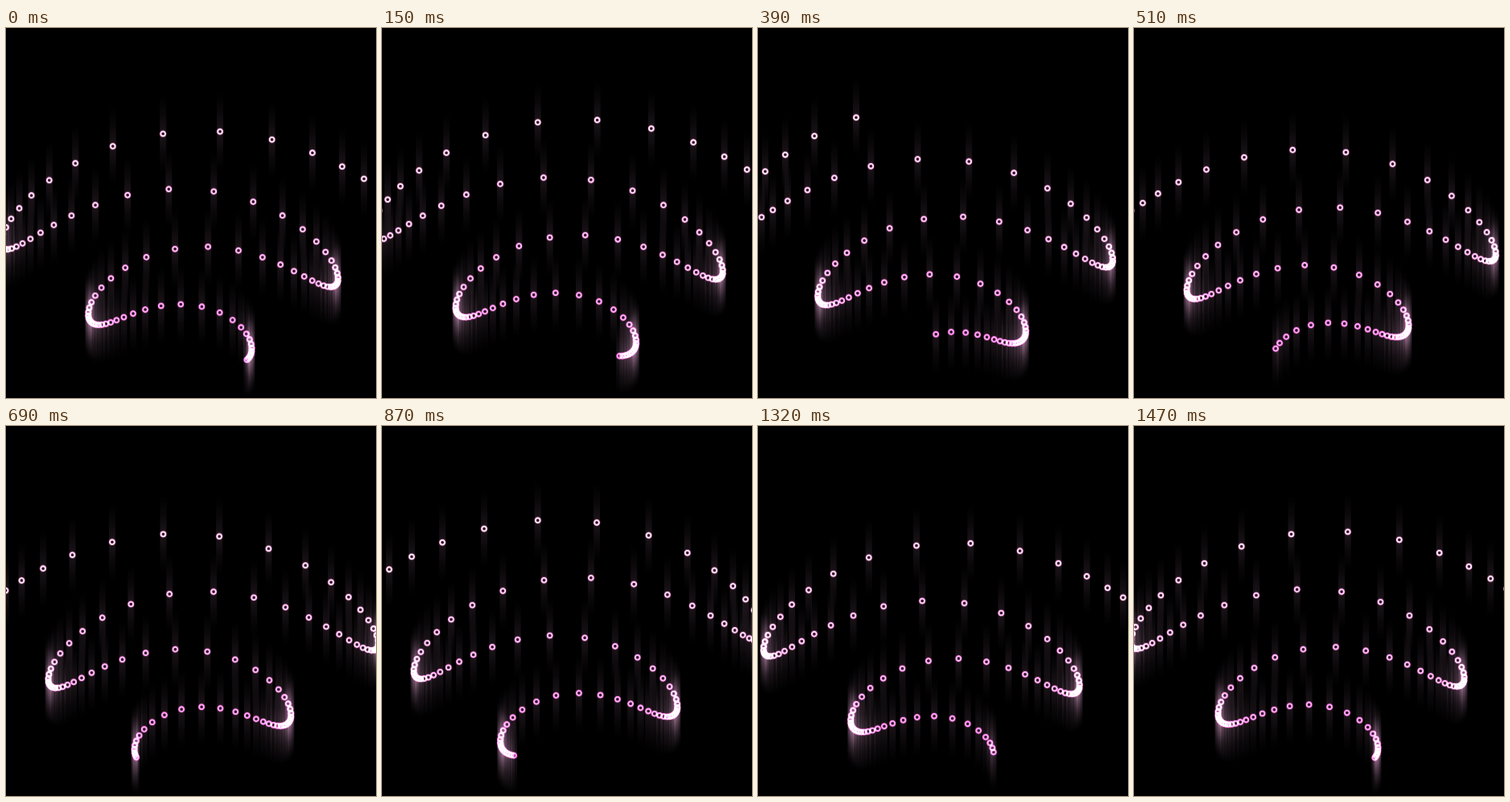
An HTML page with a canvas for the animation above (1.5 s loop, 460x460 px).

```html
<!DOCTYPE html>
<html lang="en">
<head>
<meta charset="utf-8">
<title>Swinging particle fountain</title>
<style>
  html, body { margin: 0; width: 100%; height: 100%; overflow: hidden; background: #000; }
  canvas { display: block; }
</style>
</head>
<body>
<canvas id="stage" width="460" height="460"></canvas>
<script>
const ctx = document.getElementById('stage').getContext('2d');
const STEP = 30, PERIOD = 50, HALF = PERIOD / 2;
const COUNT = 100, START = 90, SPEED = 2.88, SWING = 50;
const PIVOT = { x: 230.5, y: 470.3 };
const STREAK = 48;

// cubic-bezier(2/3, 0, 1/3, 1), solved by bisection
function ease(x) {
  let lo = 0, hi = 1;
  for (let i = 0; i < 24; i++) {
    const s = (lo + hi) / 2;
    if (2 * s - 3 * s * s + 2 * s * s * s < x) lo = s; else hi = s;
  }
  return lo * lo * (3 - 2 * lo);
}

// Direction of the emitter at a step, in radians from straight up
function direction(step) {
  const n = ((step % PERIOD) + PERIOD) % PERIOD;
  const degrees = SWING * (1 - 2 * ease((n % HALF) / HALF));
  return (n < HALF ? degrees : -degrees) * Math.PI / 180;
}

const directions = Array.from({ length: PERIOD }, (_, n) => direction(n));

const streak = ctx.createLinearGradient(0, -STREAK, 0, STREAK);
for (const [at, alpha] of [[0, 0], [0.25, 0.045], [0.5, 0.11], [0.75, 0.045], [1, 0]]) {
  streak.addColorStop(at, `rgba(255,185,235,${alpha})`);
}

function ring(radius, width, color) {
  ctx.beginPath();
  ctx.arc(0, 0, radius, 0, 2 * Math.PI);
  ctx.lineWidth = width;
  ctx.strokeStyle = color;
  ctx.stroke();
}

function drawParticle(step, age) {
  const angle = directions[(step - age + 2 * PERIOD) % PERIOD];
  const r = START + SPEED * age;
  const old = age / COUNT;
  ctx.setTransform(1, 0, 0, 1, PIVOT.x + r * Math.sin(angle), PIVOT.y - r * Math.cos(angle));
  ctx.fillStyle = streak;
  ctx.fillRect(-4, -STREAK, 8, 2 * STREAK);
  ring(3, 3.4, `rgba(255,${70 + 90 * old},205,0.28)`);
  ring(2.9, 1.8, `rgba(255,${135 + 60 * old},${225 + 5 * old},0.9)`);
}

function draw(now) {
  const step = Math.floor(now / STEP) % PERIOD;
  ctx.setTransform(1, 0, 0, 1, 0, 0);
  ctx.globalCompositeOperation = 'source-over';
  ctx.fillStyle = '#000';
  ctx.fillRect(0, 0, 460, 460);
  ctx.globalCompositeOperation = 'lighter';
  for (let age = COUNT - 1; age >= 0; age--) drawParticle(step, age);
}

const begin = performance.now();
function loop() {
  draw(performance.now() - begin);
  requestAnimationFrame(loop);
}
loop();
</script>
</body>
</html>
```
